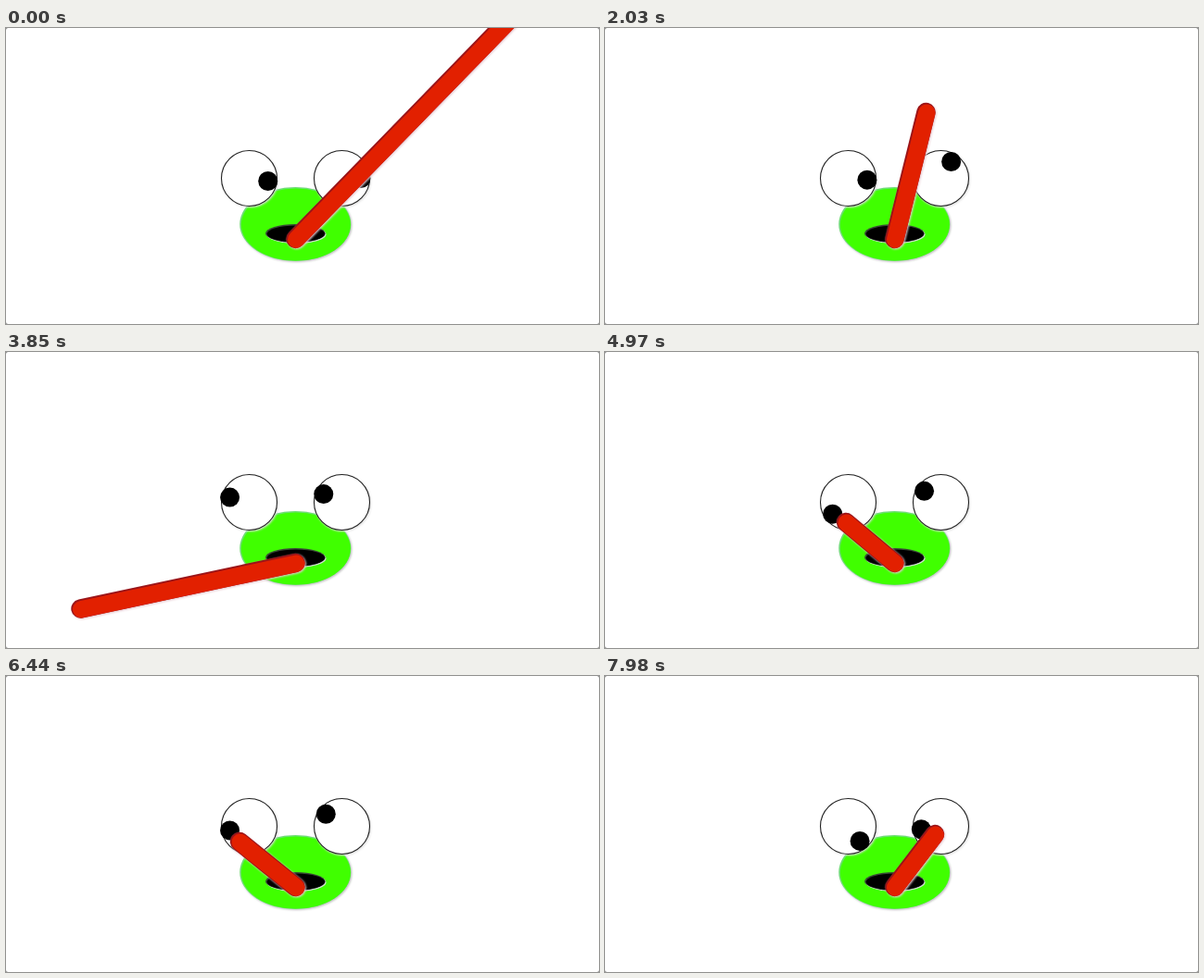
Recreate the animation shown at these times as an HTML page. Size 640x320 px, loop 8000 ms.

```html
<!DOCTYPE html>
<html lang="en">
<head>
<meta charset="utf-8">
<title>Frog</title>
<style>
  html, body { margin: 0; width: 100%; height: 100%; overflow: hidden; background: #888; }
  svg { display: block; width: 100vw; height: 100vh; }
  .body { filter: drop-shadow(1px 1px 1px #bbb); }
  .mouth { filter: drop-shadow(1px 1px .7px #cdc); }
  .eye { fill: #fff; stroke: #222; stroke-width: 1.1; filter: drop-shadow(1px 1px .8px #ddd); }
  .tongue { stroke-linecap: round; filter: drop-shadow(1px 1px .8px #e6c8d0); }
  .shine { filter: blur(.5px); }
</style>
</head>
<body>
<svg viewBox="0 0 640 320">
  <rect width="640" height="320" rx="2.5" fill="#fff"/>
  <g class="body">
    <ellipse cx="312.3" cy="212" rx="60" ry="40" fill="#6ae070"/>
    <ellipse class="shine" cx="312.9" cy="212.6" rx="59" ry="39" fill="#40ff00"/>
  </g>
  <g class="mouth">
    <ellipse cx="312.3" cy="222" rx="32.3" ry="10" fill="#394a35"/>
    <ellipse class="shine" cx="312.9" cy="222.6" rx="31.3" ry="9" fill="#000"/>
  </g>
  <circle class="eye" cx="262.5" cy="162.5" r="30"/>
  <circle class="eye" cx="362.5" cy="162.5" r="30"/>
  <circle class="pupil" r="10.5"/>
  <circle class="pupil" r="10.5"/>
  <g class="tongue">
    <path stroke="#9a1418" stroke-width="20.4"/>
    <path class="shine" stroke="#e22000" stroke-width="18.4" transform="translate(.7 .7)"/>
  </g>
</svg>
<script>
  const LOOP = 8000, STEP = 70;
  const BASE = [312.5, 228];
  const EYES = [[262, 162], [362, 162]];
  const ORBIT = 21, SQUINT = 46 * Math.PI / 180;

  // Strokes of [time, x, y]; the tip rests between them.
  const STROKES = [
    [[0, 662.5, -132]],
    // widening swirl
    [[140, 266, 104]],
    [[280, 266, 104], [710, 421, 165], [1050, 262, 233], [1400, 198, 165],
     [2030, 346.5, 91], [2380, 479, 170], [2800, 378, 275], [3570, 108, 272]],
    // out to the left, then up to the eye
    [[3850, 80.5, 277.5], [4130, 7, 306], [4620, 213, 249], [4970, 260, 184],
     [6300, 250, 157], [6440, 252, 179], [7350, 270, 196]],
    // across to the right
    [[7420, 270, 196], [7980, 356, 171]]
  ];

  // Smooth curve through the points of a stroke, at rest at both ends.
  function pointOn(stroke, t) {
    const i = stroke.findLastIndex(p => p[0] <= t);
    const a = stroke[i], b = stroke[i + 1];
    if (!b) return a.slice(1);
    const slope = (n, k) => {
      const prev = stroke[n - 1], next = stroke[n + 1];
      return prev && next ? (next[k] - prev[k]) / (next[0] - prev[0]) : 0;
    };
    const span = b[0] - a[0], u = (t - a[0]) / span, v = 1 - u;
    return [1, 2].map(k =>
      a[k] * v * v * (1 + 2 * u) + b[k] * u * u * (3 - 2 * u) +
      span * u * v * (slope(i, k) * v - slope(i + 1, k) * u));
  }

  const pupils = document.querySelectorAll('.pupil');
  const tongue = document.querySelectorAll('.tongue path');

  function draw(now) {
    const t = Math.floor((now % LOOP) / STEP) * STEP;
    const [x, y] = pointOn(STROKES.findLast(s => s[0][0] <= t), t);
    tongue.forEach(p => p.setAttribute('d', `M${BASE}L${x},${y}`));
    EYES.forEach(([cx, cy], i) => {
      const angle = Math.atan2(y - cy, x - cx) + SQUINT;
      pupils[i].setAttribute('cx', cx + ORBIT * Math.cos(angle));
      pupils[i].setAttribute('cy', cy + ORBIT * Math.sin(angle));
    });
  }

  let start;
  function tick(now) {
    start ??= now;
    draw(now - start);
    requestAnimationFrame(tick);
  }
  draw(0);
  requestAnimationFrame(tick);
</script>
</body>
</html>
```
